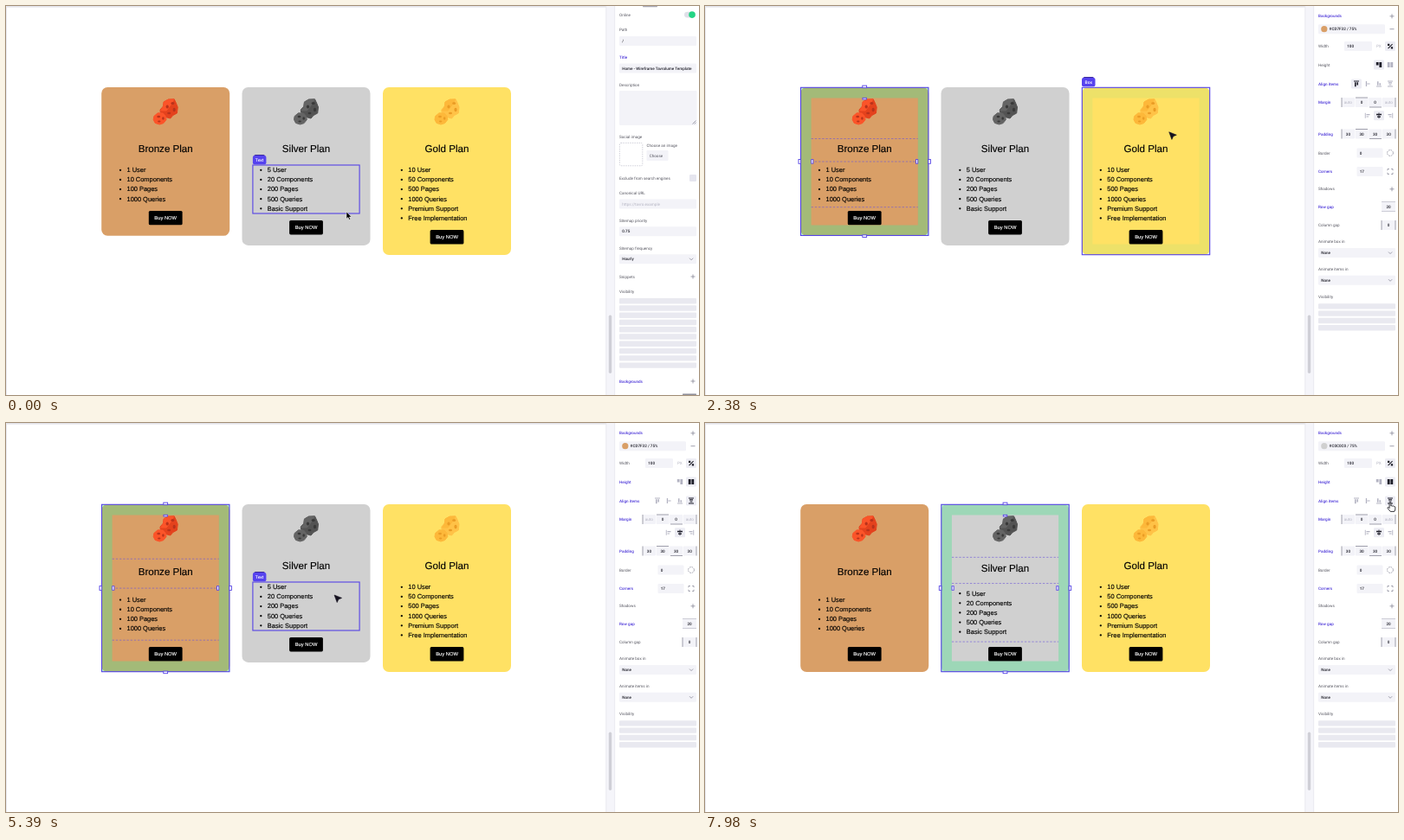
These frames come from a looping animation (800 px wide and 450 px high, 8000 ms). An HTML page:

```html
<!DOCTYPE html>
<html lang="en">
<head>
<meta charset="utf-8">
<title>Pricing cards editor</title>
<style>
html, body { margin: 0; width: 100%; height: 100%; overflow: hidden; background: #fff; }
svg { display: block; width: 100vw; height: 100vh; text-rendering: geometricPrecision; }
.card text { font-family: "Liberation Sans", Arial, sans-serif; fill: #000; stroke: #000; stroke-width: .14; }
.card .buy { fill: #fff; stroke: #fff; }
.ui { font: 4.6px Roboto, "Open Sans", sans-serif; fill: #55555f; }
.on { fill: #4b35d8; font-weight: 500; }
.dark { fill: #22222c; font-weight: 500; }
.faint { fill: #b4b4c2; }
.mid { text-anchor: middle; }
.line { fill: none; stroke: #8a8a98; stroke-width: .8; }
.thin { fill: none; stroke: #b9b9c8; stroke-width: .7; }
.frame { fill: none; stroke: #5542e6; stroke-width: 1.1; }
.grip { fill: #fff; stroke: #5542e6; stroke-width: .9; }
.tag { font: 500 5px Roboto, "Open Sans", sans-serif; fill: #fff; text-anchor: middle; }
</style>
</head>
<body>
<svg viewBox="0 0 800 450" preserveAspectRatio="none">
  <rect width="800" height="450" fill="#fff"/>
  <rect width="693" height="1.6" fill="#e4e4ea"/>
  <rect width="1" height="450" fill="#e6e6ec"/>
  <g id="cards"></g>
  <g id="picked"></g>
  <g id="hover"></g>
  <rect x="692.5" width="10.5" height="450" fill="#f5f5fa"/>
  <path d="M692.8 0V450M702.7 0V450" stroke="#e6e6ee" stroke-width=".8"/>
  <rect x="695.8" y="357.5" width="3.4" height="67.5" rx="1.7" fill="#cfcfd6"/>
  <g id="panel"></g>
  <circle id="ring" r="13" fill="#5b7be0" fill-opacity=".12" stroke="#5a78dc" stroke-width="1.7"/>
  <g id="pointer"></g>
</svg>
<script>
const $ = id => document.getElementById(id);
const LOOP = 8000, LAG = 40, TOP = 94, WIDE = 148, PAD = 12.4, FULL = 194, ROW = 11.12;
const cards = [
  { name: 'Bronze Plan', x: 110.2, fill: '#d99f67', hex: '#CD7F32', rock: ['#fb5429', '#e4421d', '#b9331b'],
    rows: ['1 User', '10 Components', '100 Pages', '1000 Queries'] },
  { name: 'Silver Plan', x: 272.5, fill: '#d0d0d0', hex: '#C0C0C0', rock: ['#646464', '#535353', '#383838'],
    rows: ['5 User', '20 Components', '200 Pages', '500 Queries', 'Basic Support'] },
  { name: 'Gold Plan', x: 435, fill: '#ffe164', hex: '#FFD732', rock: ['#fdb83a', '#ffc247', '#ea9c25'],
    rows: ['10 User', '50 Components', '500 Pages', '1000 Queries', 'Premium Support', 'Free Implementation'] }
];

// ---- small drawing helpers
const rect = (x, y, w, h, fill, r = 1.2) =>
  `<rect x="${x}" y="${y}" width="${w}" height="${h}" rx="${r}" fill="${fill}"/>`;
const path = (d, cls = 'line') => `<path d="${d}" class="${cls}"/>`;
const label = (s, y, cls = '', x = 708) => `<text class="ui ${cls}" x="${x}" y="${y + 1.65}">${s}</text>`;
const field = (y, s = '', cls = 'dark', x = 708, w = 89, h = 11) =>
  rect(x, y - h / 2, w, h, '#f3f3f8') + label(s, y, cls, x + 3.2);
const plus = y => path(`M790.5 ${y}h5M793 ${y - 2.5}v5`);
const pick = (y, s) => field(y, s) + path(`M789 ${y - 1}l2.1 2.1l2.1 -2.1`);
const bars = (y, n) => Array.from({ length: n }, (_, i) => rect(708, y + i * 8.27, 89, 6.4, '#e9e9f0', 1)).join('');

// ---- cards
function rock(c, [light, base, spot]) {
  const p = (d, f) => `<path d="${d}" fill="${f}" stroke="${f}" stroke-width="1" stroke-linejoin="round"/>`;
  const dot = (x, y, a, b) => `<ellipse cx="${x}" cy="${y}" rx="${a}" ry="${b}" fill="${spot}"/>`;
  return `<g transform="translate(${c} 0)">` +
    p('M-2 111L3 108.2L10 107.8L12 112L14 117L13.2 124L8.5 126.5L5.5 130L0 128.5L-6 123L-6.2 120L-2.6 116Z', base) +
    p('M-2 111L3 108.2L9.5 108L7 113L1 121L-5.5 121L-2.6 116Z', light) +
    dot(8.2, 112.6, 2, 1.5) + dot(2, 116.5, 1.6, 2) + dot(10, 120, 1.6, 2.2) + dot(4, 124, 2, 1.3) +
    p('M-13.4 127.5L-9 123.8L-3 124L0 127.4L.8 131.5L-2.4 135.6L-7 137L-12 135.4L-14 131.5Z', light) +
    dot(-8, 128, 1.9, 1.3) + dot(-2.8, 130, 1.3, 1.8) + dot(-7.4, 133.6, 1.7, 1) + '</g>';
}

for (const c of cards) {
  c.mid = c.x + WIDE / 2;
  c.listH = c.rows.length * ROW;
  c.natural = 127.3 + c.listH;
  const by = 192.4 + c.listH;
  const g = document.createElementNS('http://www.w3.org/2000/svg', 'g');
  g.setAttribute('class', 'card');
  g.innerHTML = rect(c.x, TOP, WIDE, c.natural, c.fill, 7) + rock(c.mid, c.rock) +
    `<text x="${c.mid}" y="168.6" font-size="11.57" text-anchor="middle">${c.name}</text><g>` +
    c.rows.map((s, i) => `<circle cx="${c.x + 21.8}" cy="${189.8 + i * ROW}" r="1.15"/>` +
      `<text x="${c.x + 29.3}" y="${192.2 + i * ROW}" font-size="7.44">${s}</text>`).join('') + '</g><g>' +
    rect(c.mid - 19.4, by, 38.8, 16.4, '#000', 1.6) +
    `<text class="buy" x="${c.mid}" y="${by + 10.3}" font-size="5.79" text-anchor="middle">Buy NOW</text></g>`;
  $('cards').append(g);
  const k = g.children;
  c.box = k[0];
  c.parts = [k[2], k[3], k[4]];
}

function band(c, h, alpha) {
  const w = WIDE - 2 * PAD;
  return `<path fill="rgb(82,224,146)" fill-opacity="${alpha}" fill-rule="evenodd" d="M${c.x} ${TOP}h${WIDE}v${h}h${-WIDE}z` +
    `M${c.x + PAD} ${TOP + PAD}h${w}v${h - 2 * PAD}h${-w}z"/>`;
}
const outline = (x, y, w, h) => `<rect class="frame" x="${x}" y="${y}" width="${w}" height="${h}"/>`;
const edge = (c, h) => outline(c.x + .3, TOP + .3, WIDE - .6, h - .6);

function selection(c, h, d) {
  const my = TOP + h / 2, r = c.x + WIDE, left = c.x + PAD, right = r - PAD;
  const grip = (x, y, w, v) => `<rect class="grip" x="${x - w / 2}" y="${y - v / 2}" width="${w}" height="${v}"/>`;
  const dash = [153.5 + d / 2, 180 + d * 1.5, 188.2 + c.listH + d * 2.5]
    .map(y => `M${left} ${y}H${right}`).join('');
  return band(c, h, .4) +
    `<path d="${dash}" stroke="#6a55d8" stroke-opacity=".75" stroke-width=".8" stroke-dasharray="2.4 1.8"/>` +
    edge(c, h) +
    grip(c.mid, TOP - .6, 4.8, 2.6) + grip(c.mid, TOP + h + .4, 4.8, 2.6) +
    grip(c.x - .9, my, 2.6, 4.8) + grip(r + .9, my, 2.6, 4.8) +
    grip(c.mid, TOP + PAD + .8, 4.4, 1.8) + grip(left + 1.2, my, 2.2, 4.6) + grip(right - 1.2, my, 2.2, 4.6);
}

function tag(s, x, y) {
  return rect(x + 1.5, y - 12, 12.5, 4, '#3a299e', 1.5) + rect(x, y - 11, 15.5, 10.2, '#5643ee', 2) +
    `<text class="tag" x="${x + 7.8}" y="${y - 4.1}">${s}</text>`;
}

// ---- side panels
function pagePanel() {
  return rect(735, 0, 17, 1.2, '#a9a9b4', .4) +
    label('Online', 10) + rect(783, 6.7, 13, 6.8, '#dfe0e8', 3.4) + '<circle cx="792" cy="10.1" r="3.8" fill="#24d584"/>' +
    label('Path', 27.5) + field(40.5, '/') +
    label('Title', 59.5, 'on') + field(72, 'Home - Wireframe Tavrolume Template') +
    label('Description', 91.5) + rect(708, 98, 89.5, 40, '#f3f3f8') + path('M792.5 136.5l4 -4M794.7 136.5l1.8 -1.8') +
    label('Social image', 151.5) +
    '<rect x="708.4" y="158.4" width="26.4" height="26.4" rx="1.5" class="thin" stroke-dasharray="1.4 1.2"/>' +
    label('Choose an image', 161, '', 739.5) + field(173, 'Choose', '', 739.5, 25, 12) +
    label('Exclude from search engines', 199) + rect(789, 195, 8, 8, '#e5e5ef') +
    label('Canonical URL', 216) + field(229, 'https://tavro.example', 'faint') +
    label('Sitemap priority', 248) + field(260.7, '0.75') +
    label('Sitemap frequency', 280.5) + pick(292.7, 'Hourly') +
    label('Snippets', 313) + plus(313) +
    label('Visibility', 330) + bars(338, 10) +
    label('Backgrounds', 434, 'on') + plus(434) + rect(781, 448.6, 16, 1.4, '#8f8f9a', .4);
}

function icon(x, y, d, on) {
  return (on ? rect(x - 6, y - 5.5, 12, 11, '#ededf4') : '') +
    `<path transform="translate(${x} ${y})" d="${d}" fill="${on ? '#1d1d28' : '#b3b3c2'}"/>`;
}
function quad(y, values, faintEnds) {
  const side = ['M735 -5.5v11', 'M751 -5.5h14', 'M767 5.5h14', 'M797 -5.5v11'];
  return values.map((v, i) => rect(735 + i * 15.6, y - 5.5, 15, 11, '#f3f3f8') +
    label(v, y, 'mid ' + (faintEnds && i % 3 === 0 ? 'faint' : 'dark'), 742.4 + i * 15.6) +
    `<path transform="translate(0 ${y})" d="${side[i]}" class="line"/>`).join('');
}

function boxPanel(c, tall, spread, heightOn) {
  const ALIGN = ['M-3 -3.5h6v1h-6zM-2 -1.8h1.6v5h-1.6zM.4 -1.8h1.6v3.4h-1.6z', 'M-2.2 -3h1.3v6h-1.3zM-.6 -.4h3.2v.9h-3.2z',
    'M-3 2.6h6v1h-6zM-2 -2.8h1.5v4.6h-1.5zM.5 -.8h1.5v2.6h-1.5z', 'M-3 -3.6h6v1h-6zM-3 2.6h6v1h-6zM-2 -1.7h4v1.2h-4zM-1.4 .4h2.8v1.2h-2.8z'];
  const SIDE = ['M-3.2 -3h.9v6h-.9zM-1.5 -1.8h4v1.2h-4zM-1.5 .6h2.6v1.2h-2.6z',
    'M-3 -2h6v1.4h-6zM-2 .6h4v1.4h-4zM-.4 -3.2h.8v6.4h-.8z', 'M2.3 -3h.9v6h-.9zM-2.5 -1.8h4v1.2h-4zM-1.1 .6h2.6v1.2h-2.6z'];
  const on = spread ? 3 : 0;
  return label('Backgrounds', 11.8, 'on') + plus(11.8) +
    rect(708, 21.2, 77, 11, '#f3f3f8') + `<circle cx="714.8" cy="26.7" r="3.6" fill="${c.fill}"/>` +
    label(c.hex + ' / 75%', 26.7, 'dark', 720.6) + path('M790.5 26.7h5') +
    label('Width', 46.5) + field(46.5, '100', 'dark', 738, 32) + label('PX', 46.5, 'faint mid', 777.8) +
    icon(791, 46.5, 'M-2.8 2.2L2.2 -2.8L2.9 -2.1L-2.1 2.9zM-3 -2.8h2.3v2.3h-2.3zM.8 .8h2.3v2.3h-2.3z', true) +
    label('Height', 68, heightOn ? 'on' : '') +
    icon(778, 68, 'M-3.2 -3h2.8v3.6h-2.8zM.4 -3h2.8v6h-2.8z', !tall) +
    icon(791, 68, 'M-3.2 -3h2.8v6h-2.8zM.4 -3h2.8v6h-2.8z', tall) +
    label('Align items', 90, 'on') + ALIGN.map((d, i) => icon(752 + i * 13, 90, d, i === on)).join('') +
    label('Margin', 111.5, 'on') + quad(111.5, ['auto', '0', '0', 'auto'], true) +
    SIDE.map((d, i) => icon(765 + i * 13, 126.8, d, i === 1)).join('') +
    label('Padding', 148, 'on') + quad(148, ['30', '30', '30', '30']) +
    label('Border', 170) + field(170, '0', 'dark', 752.5, 30) +
    '<circle cx="791" cy="170" r="3.4" class="line" stroke-dasharray="1.7 1"/>' +
    label('Corners', 191.5, 'on') + field(191.5, '17', 'dark', 752.5, 30) +
    path('M788 190.3v-1.8h1.8M792.2 188.5h1.8v1.8M794 192.7v1.8h-1.8M789.8 194.5h-1.8v-1.8') +
    label('Shadows', 211.8) + plus(211.8) +
    label('Row gap', 232, 'on') + rect(781, 226.5, 16, 11, '#f3f3f8') + label('20', 232, 'dark mid', 789) +
    path('M781 226.5h16M781 237.5h16', 'thin') +
    label('Column gap', 253.5) + rect(781, 248, 16, 11, '#f3f3f8') + label('0', 253.5, 'dark mid', 789) +
    path('M781 248v11M797 248v11') +
    label('Animate box in', 272.8) + pick(285.5, 'None') +
    label('Animate items in', 304.5) + pick(317.2, 'None') +
    label('Visibility', 336.5) + bars(344.2, 4);
}

// ---- pointer: time, x, y
const route = [[0, 393, 238], [70, 393, 238], [420, 340, 237], [560, 340, 237], [1330, 248.6, 228.6], [1830, 248.6, 228.6],
  [2380, 535, 146], [2960, 791, 68], [3520, 791, 68], [3850, 792.5, 94], [4980, 792.5, 94], [5390, 379, 199],
  [5740, 414, 230], [6180, 414, 230], [6510, 492, 154], [6900, 791, 68], [7330, 791, 68], [7680, 791, 92], [LOOP, 791, 92]];
const passing = [2380, 6510];
function pointerAt(t) {
  const i = Math.max(1, route.findIndex(k => k[0] > t));
  const [a, x0, y0] = route[i - 1], [b, x1, y1] = route[i];
  let p = (t - a) / (b - a);
  const fromStop = !passing.includes(a), toStop = !passing.includes(b);
  if (fromStop && toStop) p = p * p * (3 - 2 * p);
  else if (fromStop) p = p * (.6 + .4 * p);
  else p = p * (1.6 - .6 * p);
  return [x0 + (x1 - x0) * p, y0 + (y1 - y0) * p];
}
const ARROW = '<path d="M0 0V8.2L1.9 6.5L3.2 9.3L4.6 8.7L3.4 6H5.9Z" fill="#000" stroke="#fff" stroke-width=".5"/>';
const DART = '<path d="M0 0L8.6 3.4L4.9 4.9L3.2 8.6Z" fill="#15111f" stroke="#15111f" stroke-width=".6" stroke-linejoin="round"/>';
const HAND = '<path d="M-.9 .6Q0 -.8 .9 .6V4Q2 3.2 2.6 4.2Q3.8 3.5 4.3 4.6Q5.6 4.2 5.8 5.4V7.6Q5.6 9 4.8 10.4H.2Q-1.6 8.4 -3 6.4Q-3 5.2 -1.8 5.6L-.9 6.5Z" fill="#fff" stroke="#1a1a22" stroke-width=".9" stroke-linejoin="round"/>';

const clicks = [1540, 3400, 4480, 5960, 7150];
const seen = {};
function put(id, key, make) {
  if (seen[id] === key) return;
  seen[id] = key;
  $(id).innerHTML = make();
}

function draw(t) {
  const sel = t < clicks[0] ? -1 : t < clicks[3] ? 0 : 1;
  const tall = [t >= clicks[1], t >= clicks[4], false];
  const spread = [t >= clicks[2], t >= clicks[3], false];
  const heights = cards.map((c, i) => tall[i] ? FULL : c.natural);
  const steps = cards.map((c, i) => spread[i] ? (heights[i] - c.natural) / 3 : 0);
  cards.forEach((c, i) => {
    c.box.setAttribute('height', heights[i]);
    c.parts.forEach((p, j) => p.setAttribute('transform', `translate(0 ${steps[i] * (j + 1)})`));
  });
  put('picked', [sel, heights, steps].join(), () => sel < 0 ? '' : selection(cards[sel], heights[sel], steps[sel]));
  put('panel', [sel, tall, spread].join(), () =>
    sel < 0 ? pagePanel() : boxPanel(cards[sel], tall[sel], spread[sel], sel === 1 || tall[0]));

  // the highlight trails the pointer a little
  const [hx, hy] = pointerAt(Math.max(0, t - LAG));
  const h = cards.findIndex((c, i) => hx >= c.x && hx <= c.x + WIDE && hy >= TOP && hy <= TOP + heights[i]);
  const titleY = 157.6 + (steps[h] || 0), listY = 184 + 2 * (steps[h] || 0);
  let kind = '';
  if (h >= 0) {
    const c = cards[h], inside = hx > c.x + PAD && hx < c.x + WIDE - PAD;
    if (inside && hy >= titleY && hy <= titleY + 14) kind = 'title';
    else if (inside && hy >= listY && hy <= listY + c.listH) kind = 'list';
    else if (h !== sel) kind = 'box';
  }
  put('hover', [h, kind, heights, steps].join(), () => {
    if (!kind) return '';
    const c = cards[h];
    if (kind === 'box') return band(c, heights[h], .1) + edge(c, heights[h]) + tag('Box', c.x, TOP);
    const [top, high] = kind === 'title' ? [titleY, 14] : [listY, c.listH + .4];
    return outline(c.x + PAD, top, WIDE - 2 * PAD, high) + tag('Text', c.x + PAD, top);
  });

  const [x, y] = pointerAt(t);
  const look = x > 703 ? HAND : t < 70 ? ARROW : DART;
  put('pointer', look, () => look);
  $('pointer').setAttribute('transform', `translate(${x} ${y})`);

  const age = Math.min(...clicks.map(c => t - c + 60).filter(a => a >= 0));
  const ring = $('ring');
  ring.setAttribute('cx', x - 1.6);
  ring.setAttribute('cy', y - .6);
  ring.setAttribute('r', 8 + 5 * Math.min(1, age / 120));
  ring.setAttribute('opacity', age < 230 ? 1 : Math.max(0, 1 - (age - 230) / 90));
}

const start = performance.now();
function tick() {
  draw((performance.now() - start) % LOOP);
  requestAnimationFrame(tick);
}
tick();
</script>
</body>
</html>
```
